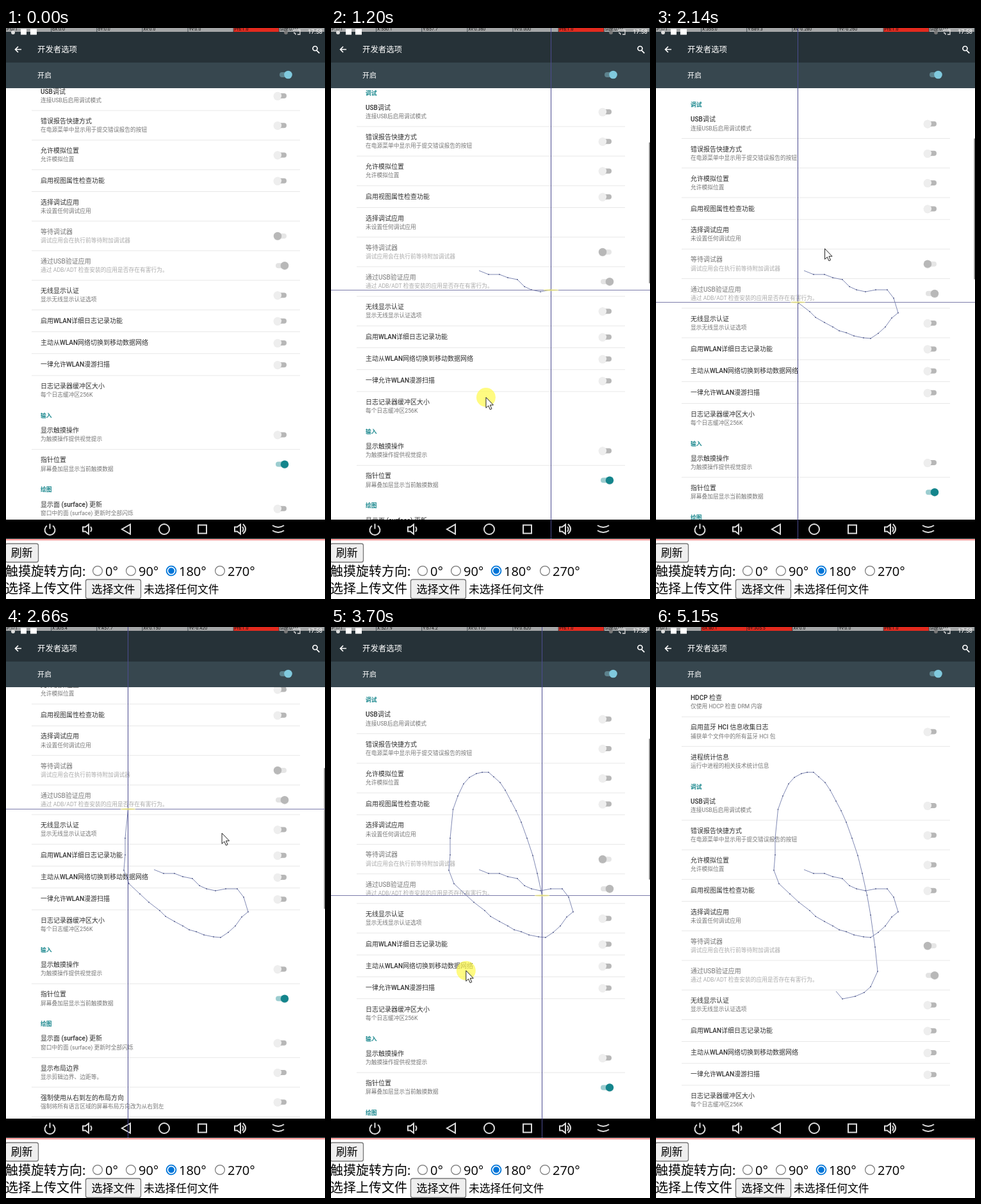
An HTML page for the animation above (5190 ms loop, 498x892 px).

```html
<!DOCTYPE html>
<html lang="zh-CN">
<head>
<meta charset="utf-8">
<style>
  html, body { margin: 0; width: 100%; height: 100%; overflow: hidden; background: #fff; }
  svg { display: block; width: 498px; height: 892px; }
  text { font-family: Roboto, "Noto Sans CJK SC", "Noto Sans CJK", sans-serif; white-space: pre; }
  .page text { font-family: "Open Sans", "Noto Sans CJK SC", "Noto Sans CJK", sans-serif; }
  .icon { fill: none; stroke: #ddd; stroke-width: 2; }
</style>
</head>
<body>
<svg viewBox="0 0 498 892">
  <defs>
    <clipPath id="view"><rect y="94" width="498" height="674"/></clipPath>
    <clipPath id="device"><rect width="498" height="798"/></clipPath>
    <marker id="dot" markerUnits="userSpaceOnUse" markerWidth="3" markerHeight="3" refX="1.5" refY="1.5">
      <circle cx="1.5" cy="1.5" r=".9" fill="#5d6490"/>
    </marker>
  </defs>
  <rect width="498" height="892" fill="#fff"/>
  <g clip-path="url(#view)"><g id="list"></g></g>
  <rect id="bar" x="496.5" width="1.5" height="220" fill="#808080"/>
  <g id="chrome"></g>
  <g id="info"></g>
  <g id="status"></g>
  <g clip-path="url(#device)" fill="none">
    <polyline id="trail" stroke="#8089b4" marker-mid="url(#dot)"/>
    <g id="cross">
      <path id="lineH" stroke="#7c7caa"/>
      <path id="lineV" stroke="#4c4c90"/>
      <ellipse id="touch" rx="12" ry="1.4" fill="#f3ee7c" opacity=".7"/>
    </g>
  </g>
  <g id="page" class="page"></g>
  <g id="mouse">
    <circle id="halo" r="15" fill="#fffa50" opacity=".72"/>
    <path d="M0 0V16.5L3.8 13 6.4 19 9 17.8 6.4 12H11.5Z" fill="#fff" stroke="#222"/>
  </g>
</svg>
<script>
const LOOP = 5190, DOWN = 670, UP = 4520, END_SCROLL = 173;
const $ = id => document.getElementById(id);

const text = (x, y, size, fill, s, weight = 400, anchor = 'start') =>
  `<text x="${x}" y="${y}" dy=".37em" font-size="${size}" fill="${fill}" font-weight="${weight}" text-anchor="${anchor}">${s}</text>`;
const rect = (x, y, w, h, fill, more = '') =>
  `<rect x="${x}" y="${y}" width="${w}" height="${h}" fill="${fill}" ${more}/>`;
const disc = (x, y, r, fill, more = '') =>
  `<circle cx="${x}" cy="${y}" r="${r}" fill="${fill}" ${more}/>`;
const icon = (d, more = '') => `<path class="icon" d="${d}" ${more}/>`;

// Switch kinds: [track, knob, knob x]
const switches = {
  off: ['#b7b7b7', '#eeeeee', 424],
  on: ['#9ccdd0', '#14858c', 435],
  disOff: ['#e6e6e6', '#b8b8b8', 424],
  disOn: ['#e3e3e3', '#b8b8b8', 435]
};
function toggle(y, kind) {
  const [track, knob, x] = switches[kind];
  return rect(421, y - 4, 17, 8, track, 'rx="4"') +
    disc(x, y + .6, 6.4, '#000', 'opacity=".08"') + disc(x, y, 6.2, knob);
}

// Rows: [title, subtitle, switch]; a lone string is a section heading
const rows = [
  ['HDCP 检查', '仅使用 HDCP 检查 DRM 内容'],
  ['启用蓝牙 HCI 信息收集日志', '捕获单个文件中的所有蓝牙 HCI 包', 'off'],
  ['进程统计信息', '运行中进程的相关技术统计信息'],
  '调试',
  ['USB调试', '连接USB后启用调试模式', 'off'],
  ['错误报告快捷方式', '在电源菜单中显示用于提交错误报告的按钮', 'off'],
  ['允许模拟位置', '允许模拟位置', 'off'],
  ['启用视图属性检查功能', '', 'off'],
  ['选择调试应用', '未设置任何调试应用'],
  ['等待调试器', '调试应用会在执行前等待附加调试器', 'disOff'],
  ['通过USB验证应用', '通过 ADB/ADT 检查安装的应用是否存在有害行为。', 'disOn'],
  ['无线显示认证', '显示无线显示认证选项', 'off'],
  ['启用WLAN详细日志记录功能', '', 'off'],
  ['主动从WLAN网络切换到移动数据网络', '', 'off'],
  ['一律允许WLAN漫游扫描', '', 'off'],
  ['日志记录器缓冲区大小', '每个日志缓冲区256K'],
  '输入',
  ['显示触摸操作', '为触摸操作提供视觉提示', 'off'],
  ['指针位置', '屏幕叠加层显示当前触摸数据', 'on'],
  '绘图',
  ['显示面 (surface) 更新', '窗口中的面 (surface) 更新时全部闪烁', 'off'],
  ['显示布局边界', '显示剪辑边界、边距等。', 'off'],
  ['强制使用从右到左的布局方向', '强制将所有语言区域的屏幕布局方向改为从右到左', 'off'],
  ['窗口动画缩放', '动画缩放 1x']
];

function buildList() {
  let y = -79, out = '';
  rows.forEach((row, i) => {
    if (typeof row === 'string') {
      out += text(54, y + 16.8, 8.8, '#1b888e', row, 700);
      y += 23;
      return;
    }
    const [title, sub, kind] = row, dim = kind && kind.startsWith('dis');
    const h = sub ? 46.2 : 34.2;
    out += text(54, y + (sub ? 16.4 : 17), 10, dim ? '#777' : '#303030', title, dim ? 400 : 500);
    if (sub) out += text(54, y + 30.2, 8.75, dim ? '#aaa' : '#777', sub);
    if (kind) out += toggle(y + (sub ? 23.4 : 17.6), kind);
    y += h;
    if (Array.isArray(rows[i + 1])) out += rect(40, y - .4, 419, 1, '#e8e8e8');
  });
  return out;
}

function buildChrome() {
  const speaker = x => `M${x} 779.5h4l5-4v15l-5-4h-4z`;
  return rect(0, 0, 498, 54, '#263238') + rect(0, 54, 498, 40, '#37474f') +
    icon('M24 33.5H15M19 29l-4.5 4.5 4.5 4.5', 'style="stroke:#fff;stroke-width:1.6"') +
    text(49, 33, 12.4, '#fff', '开发者选项', 500) +
    icon('M485.3 35.3l4 4M486 32a3.5 3.5 0 1 1-7 0a3.5 3.5 0 1 1 7 0', 'style="stroke:#fff;stroke-width:1.7"') +
    text(49, 74, 11, '#fff', '开启', 500) +
    rect(427, 69, 15, 8, '#5d828d', 'rx="4"') + disc(440.5, 73, 6.3, '#80c9dd') +
    rect(0, 768, 498, 30, '#000') +
    icon('M64 777.5a8 8 0 1 0 9 0M68.5 774.5v8') +
    icon(speaker(120) + 'M132 779q3 4 0 8') +
    icon('M194 775.5v15l-13-7.5z') +
    icon('M255 783a8 8 0 1 1-16 0a8 8 0 1 1 16 0') +
    icon('M300 776.5h13v13h-13z') +
    icon(speaker(357) + 'M369 779q3 4 0 8M370 775q8 8 0 15') +
    icon('M416 777q9 6 18 0M416 785q9 6 18 0') +
    rect(0, 799, 498, 1, '#e33');
}

function buildStatus() {
  return disc(11, 7, 3, '#ddd') + rect(23, 1.5, 9, 9, '#fff') + rect(38, 1.5, 10, 9, '#fff') +
    disc(437, 7, 3, '#777') +
    icon('M449 5V3h10v7h-4M449 7.5a3 3 0 0 1 3 3', 'style="stroke-width:1.3"') +
    text(494, 6, 9, '#eee', '17:58', 500, 'end');
}

function buildPage() {
  const button = (x, y, w, h, s) =>
    rect(x, y, w, h, '#efefef', 'rx="3" stroke="#767676" stroke-width="1.3"') +
    text(x + w / 2, y + h / 2, 17, '#000', s, 400, 'middle');
  const radio = (x, s, on) =>
    disc(x, 848, 7.4, '#fff', `stroke="${on ? '#0075d8' : '#767676'}" stroke-width="${on ? 1.8 : 1.2}"`) +
    (on ? disc(x, 848, 4.8, '#0075d8') : '') + text(x + 12, 848.5, 20, '#000', s);
  return button(-1, 805.5, 51.5, 29, '刷新') +
    text(-1, 849, 20, '#000', '触摸旋转方向:') +
    radio(143, '0°') + radio(195, '90°') + radio(258, '180°', true) + radio(334, '270°') +
    text(-1, 876, 20, '#000', '选择上传文件') +
    button(124.5, 861.5, 86, 30, '选择文件') +
    text(215, 877, 16.8, '#000', '未选择任何文件');
}

$('list').innerHTML = buildList();
$('chrome').innerHTML = buildChrome();
$('status').innerHTML = buildStatus();
$('page').innerHTML = buildPage();

// Touch samples as x,y pairs
const track = `231,379 246,385 263,385 276,390 291,393 302,404 313,409 327,412 343,409
  361,409 371,422 378,445 368,453 358,467 347,477 335,485 324,484 309,481 297,476 286,473
  276,467 263,460 249,452 240,443 223,430 209,417 192,401 184,380 186,356 186,330 190.5,285
  198,264 207,245 216,235 227,229 236,227 246,227 254,234 264,243 272,255 281,272
  289,287 297,305 306,330 315,357 322,385 329.5,419 335,450 342,500 346,538
  335,562 325,571 311,577 291,581 281,569`.split(/\s+/).map(p => p.split(',').map(Number));

// [time, sample index]
const pace = [[DOWN, 0], [1200, 8], [1780, 20], [2660, 30], [3270, 40], [3700, 46], [UP, 54]];
// [time, x, y]
const mouseKeys = [[140, 434, 862], [610, 276, 391], [670, 267, 400], [1200, 242, 577],
  [1780, 217, 399], [2660, 337, 322], [3270, 313, 469], [3700, 211, 537],
  [4100, 155, 310], [4300, 215, 330], [4520, 305, 745], [4580, 315, 765], [4670, 380, 895]];

const clamp = (v, a, b) => Math.max(a, Math.min(b, v));

function segment(keys, t) {
  let i = 0;
  while (i < keys.length - 2 && t >= keys[i + 1][0]) i++;
  return [i, clamp((t - keys[i][0]) / (keys[i + 1][0] - keys[i][0]), 0, 1)];
}

function sampleAt(t) {
  const [i, u] = segment(pace, t);
  return pace[i][1] + (pace[i + 1][1] - pace[i][1]) * u;
}

// Hermite curve with slopes taken from neighbouring keys
function mouseAt(t) {
  const [i, u] = segment(mouseKeys, t), k = mouseKeys;
  const span = k[i + 1][0] - k[i][0];
  const slope = (j, c) => {
    const a = k[Math.max(0, j - 1)], b = k[Math.min(k.length - 1, j + 1)];
    return (b[c] - a[c]) / (b[0] - a[0]) * span;
  };
  const w = u * u * (3 - 2 * u);
  return [1, 2].map(c => k[i][c] * (1 - w) + k[i + 1][c] * w +
    slope(i, c) * u * (1 - u) ** 2 - slope(i + 1, c) * u * u * (1 - u));
}

function drawInfo(t, p, v) {
  const active = t >= DOWN && t < UP, done = t >= UP;
  const moved = done ? [(p[0] - 231) * 1.602, (p[1] - 379) * 1.608] : [0, 0];
  const cells = active
    ? ['P:1/1', 'X:' + (p[0] * 1.602).toFixed(1), 'Y:' + (p[1] * 1.608).toFixed(1),
       'Xv:' + (v[0] * .02).toFixed(3), 'Yv:' + (v[1] * .02).toFixed(3)]
    : ['P:0/1', 'dX:' + moved[0].toFixed(1), 'dY:' + moved[1].toFixed(1), 'Xv:0.0', 'Yv:0.0'];
  cells.push('Prs:1.0', 'Size:0.02');
  $('info').innerHTML = cells.map((s, i) => {
    const red = i === 5 || done && (i === 1 || i === 2);
    return rect(i * 71.1, 0, 70.3, 6, red ? '#e32a1e' : '#a4a6a7') + text(i * 71.1 + 1, 1.4, 7, '#111', s);
  }).join('');
}

function draw(t) {
  const n = sampleAt(t), i = Math.min(Math.floor(n), track.length - 2);
  const [a, b] = [track[i], track[i + 1]];
  const v = [b[0] - a[0], b[1] - a[1]];
  const p = a.map((c, j) => c + v[j] * (n - i));
  const active = t >= DOWN && t < UP;

  // The list runs slightly ahead of the drawn touch point
  let scroll = Math.min(p[1] + v[1] * .08 - 384, END_SCROLL);
  if (n < 8) scroll = Math.max(0, scroll);
  if (t >= UP) scroll = END_SCROLL;
  $('list').setAttribute('transform', `translate(0 ${scroll})`);
  $('bar').setAttribute('y', 187 - scroll * .33);
  $('bar').setAttribute('opacity', t < 880 ? 0 : clamp((5150 - t) / 220, 0, 1));

  $('trail').setAttribute('points', t < DOWN ? '' : [...track.slice(0, i + 1), p].join(' '));
  $('cross').style.display = active ? '' : 'none';
  const [x, y] = p.map(c => Math.floor(c) + .5);
  $('lineH').setAttribute('d', `M0 ${y}H498`);
  $('lineV').setAttribute('d', `M${x} 0V798`);
  $('touch').setAttribute('cx', x);
  $('touch').setAttribute('cy', y);
  drawInfo(t, p, v);

  $('mouse').style.display = t >= 140 && t < 4670 ? '' : 'none';
  $('halo').style.display = t > 1730 && t < 2890 ? 'none' : '';
  $('mouse').setAttribute('transform', `translate(${mouseAt(t).join(' ')})`);
}

const start = performance.now();
function tick() {
  draw((performance.now() - start) % LOOP);
  requestAnimationFrame(tick);
}
tick();
</script>
</body>
</html>
```
